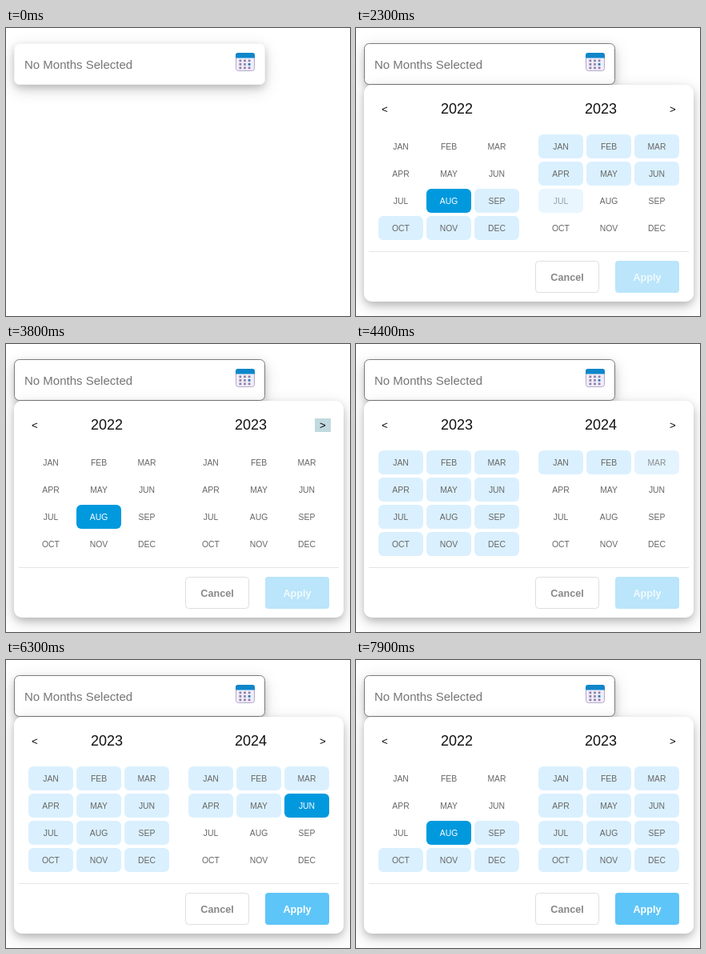
Recreate the animation shown at these times as an HTML page with a canvas. Size 430x360 px, loop 8000 ms.

```html
<!DOCTYPE html>
<html lang="en">
<head>
<meta charset="utf-8">
<title>Month range picker</title>
<style>
  html, body { margin: 0; width: 100%; height: 100%; overflow: hidden; background: #fff; }
  canvas { display: block; }
</style>
</head>
<body>
<canvas id="stage" width="430" height="360"></canvas>
<script>
const ctx = document.getElementById('stage').getContext('2d');
const LOOP = 8000;
const OPEN = 600, PICK_START = 1200, NEXT = 4100, PICK_END = 5500, PREV = 7000;
const START = 7, END = 29;   // months counted from January 2022
const MONTHS = 'JAN FEB MAR APR MAY JUN JUL AUG SEP OCT NOV DEC'.split(' ');

// [time, what the pointer rests on]
const HOVERS = [
  [0, null], [1000, 7], [2050, 8], [2150, 18], [2450, 19], [2650, 20], [2850, 17],
  [3150, 14], [3300, null], [3400, '>'], [4300, 26], [4500, 29], [5080, 28],
  [5200, 29], [6200, null], [6700, '<'], [7300, null]
];

const clamp = x => Math.max(0, Math.min(1, x));
const mix = (a, b, k) => a + (b - a) * clamp(k);

function box(x, y, w, h, r, fill, stroke) {
  ctx.beginPath();
  ctx.roundRect(x, y, w, h, r);
  if (fill) { ctx.fillStyle = fill; ctx.fill(); }
  if (stroke) { ctx.strokeStyle = stroke; ctx.lineWidth = 1; ctx.stroke(); }
}

function card(x, y, w, h, r) {
  for (const [dy, blur, alpha] of [[6, 20, .17], [4, 8, .17]]) {
    ctx.shadowColor = `rgba(0,0,0,${alpha})`;
    ctx.shadowOffsetY = dy;
    ctx.shadowBlur = blur;
    box(x, y, w, h, r, '#fff');
  }
  ctx.shadowColor = 'transparent';
}

function text(str, x, y, size, color, align = 'center', weight = 'normal') {
  ctx.font = `${weight} ${size}px "Liberation Sans", Arial, sans-serif`;
  ctx.textAlign = align;
  ctx.fillStyle = color;
  ctx.fillText(str, x, y);
}

function calendarIcon() {
  box(287.5, 31.5, 23, 22, 3, '#f1ecf8', '#b5abcb');
  box(287, 31, 24, 6.5, [3, 3, 0, 0], '#0e86ca');
  for (let i = 0; i < 9; i++) {
    const x = 291.5 + i % 3 * 5.6, y = 39.5 + Math.floor(i / 3) * 4.5;
    box(x, y, 2.8, 2.8, .5, i === 5 ? '#1c7fc0' : '#8d83a8');
  }
}

function input(open) {
  card(10.5, 19.5, 313, 51, 6);
  box(10.5, 19.5, 313, 51, 6, '#fff', open ? '#7c7c7c' : '#f3f3f3');
  text('No Months Selected', 23, 51, 15, '#757575', 'left');
  calendarIcon();
}

function monthCell(month, x, y, state) {
  const { t, hover, since } = state;
  const selected = month === START && t >= PICK_START || month === END && t >= PICK_END;
  const last = t >= PICK_END ? END : typeof hover === 'number' ? hover : -1;
  const inRange = t >= PICK_START && month > START && month <= last;
  if (month === hover && !selected) ctx.globalAlpha = mix(1, .6, (t - since) / 150);
  if (selected) box(x, y, 56, 30, 6, '#0099de');
  else if (inRange || month === hover) box(x, y, 56, 30, 6, '#daf0fe');
  text(MONTHS[month % 12], x + 28, y + 19, 10.4, selected ? '#fff' : '#666');
  ctx.globalAlpha = 1;
}

function arrow(sign, x, hover) {
  if (hover === sign) box(x - 10, 93, 20, 17, 0, '#c1d9df');
  text(sign, x, 106, 13.33, '#000');
}

function panel(state) {
  const { t, hover } = state;
  card(10, 71, 412, 271, 10);
  const firstYear = t >= NEXT && t < PREV ? 1 : 0;
  for (let side = 0; side < 2; side++) {
    const year = firstYear + side;
    text(2022 + year, 126 + side * 180, 107, 18, '#111');
    for (let i = 0; i < 12; i++) {
      const x = 28 + side * 200 + i % 3 * 60, y = 133 + Math.floor(i / 3) * 34;
      monthCell(year * 12 + i, x, y, state);
    }
  }
  arrow('<', 36, hover);
  arrow('>', 396, hover);

  box(16, 279, 400, 1, 0, '#e4e4e4');
  box(224.5, 291.5, 79, 39, 4, '#fff', '#dedede');
  text('Cancel', 264, 316, 12.6, '#888', 'center', 'bold');
  const k = (t - PICK_END) / 300;
  box(324, 291, 80, 40, 4, `rgb(${mix(186, 94, k)},${mix(229, 197, k)},${mix(251, 248, k)})`);
  text('Apply', 364, 316, 12.6, `rgba(255,255,255,${mix(.8, 1, k)})`, 'center', 'bold');
}

function draw(t) {
  const [since, hover] = HOVERS.findLast(([time]) => time <= t);
  ctx.fillStyle = '#fff';
  ctx.fillRect(0, 0, 430, 360);
  input(t >= OPEN);
  if (t >= OPEN) panel({ t, hover, since });
}

const begin = performance.now();
function frame() {
  draw((performance.now() - begin) % LOOP);
  requestAnimationFrame(frame);
}
frame();
</script>
</body>
</html>
```
